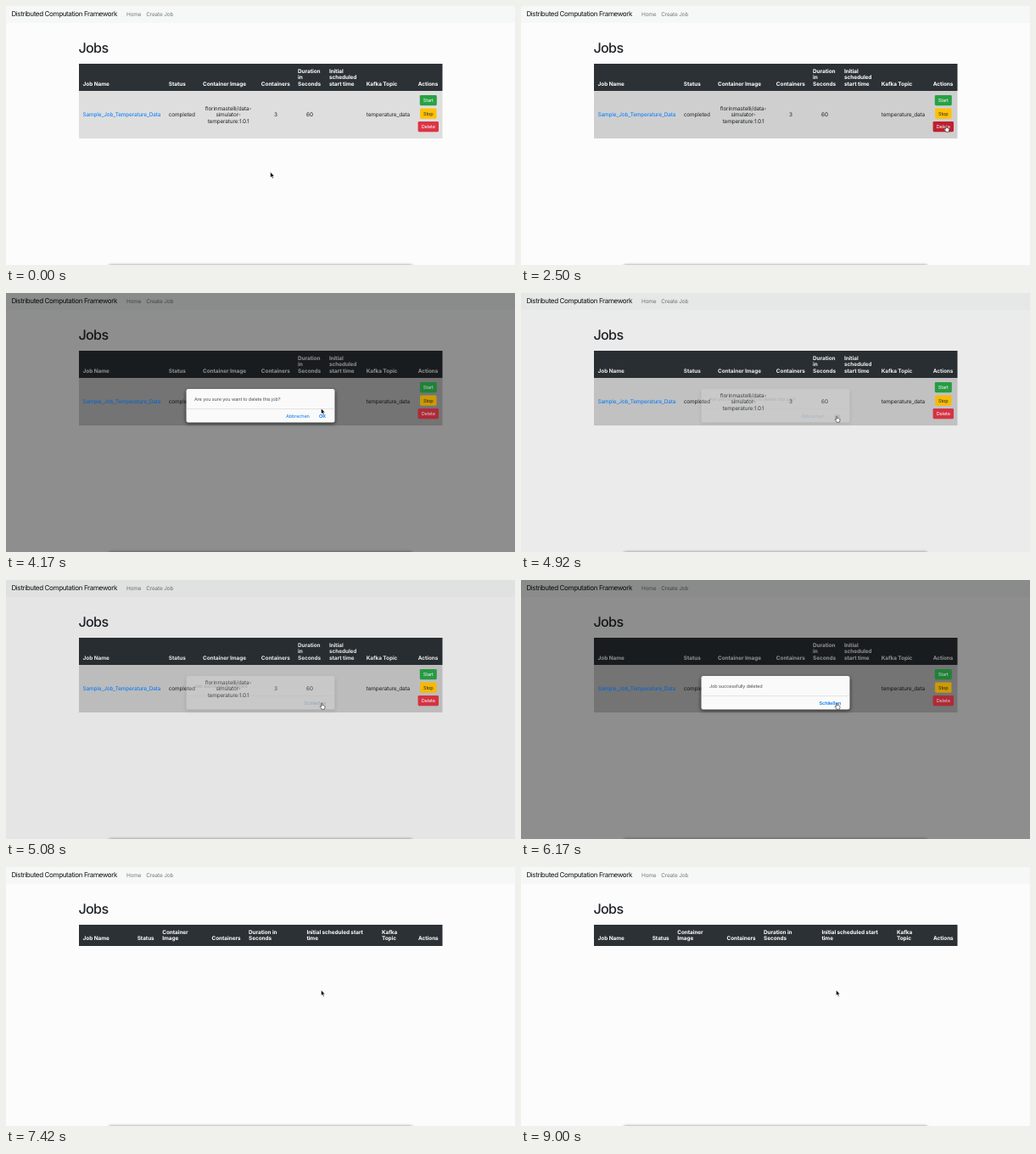
An HTML page that plays this animation: 600 by 305 pixels, repeating every 9.16 s.

```html
<!DOCTYPE html>
<html lang="en">
<head>
<meta charset="utf-8">
<title>Jobs</title>
<style>
  html, body { margin: 0; width: 100%; height: 100%; overflow: hidden; background: #fcfcfc; }
  svg { display: block; width: 600px; height: 305px; }
  text { font: 400 6.45px Inter, "Open Sans", sans-serif; letter-spacing: -.022em; fill: #212529;
         text-rendering: geometricPrecision; white-space: pre; }
  .brand { font-size: 8.05px; letter-spacing: -.048em; fill: #111; }
  .nav { fill: #777; }
  .title { font-size: 16.1px; font-weight: 500; letter-spacing: -.04em; }
  .head { font-weight: 700; letter-spacing: -.01em; fill: #fff; }
  .link { fill: #007bff; }
  .mid { text-anchor: middle; }
  .btn { font-size: 5.6px; text-anchor: middle; fill: #fff; }
  .dark { fill: #212529; }
  .msg { font-size: 5.55px; fill: #555; }
  .act { font-size: 5.55px; fill: #0a7be8; }
  .strong { font-weight: 600; }
</style>
</head>
<body>
<svg viewBox="0 0 600 305" xmlns="http://www.w3.org/2000/svg">
  <defs>
    <filter id="blur" x="-10%" y="-200%" width="120%" height="500%"><feGaussianBlur stdDeviation="1.6"/></filter>
    <filter id="soft" x="-10%" y="-30%" width="120%" height="160%"><feGaussianBlur stdDeviation="2"/></filter>
  </defs>
  <rect width="600" height="305" fill="#fcfcfc"/>
  <rect width="600" height="20" fill="#f6f8f8"/>
  <text class="brand" x="6.4" y="12.1">Distributed Computation Framework</text>
  <text class="nav" x="142" y="11.6">Home</text>
  <text class="nav" x="165.2" y="11.6">Create Job</text>
  <text class="title" x="85.4" y="55.2">Jobs</text>
  <g id="full">
    <rect x="86" y="68" width="428.5" height="32" fill="#2c3136"/>
    <rect id="row" x="86" y="100" width="428.5" height="56"/>
    <g id="fullHead"></g>
    <g id="cells"></g>
  </g>
  <g id="empty">
    <rect x="86" y="68" width="428.5" height="25" fill="#2c3136"/>
    <g id="emptyHead"></g>
  </g>
  <rect x="120" y="304.5" width="360" height="10" rx="4" opacity=".35" filter="url(#blur)"/>
  <rect id="shade" width="600" height="305"/>
  <g id="lifted">
    <text class="link" x="90.6" y="130.3">Sample_Job_Temperature_Data</text>
    <g id="buttons"></g>
  </g>
  <g id="dialog">
    <rect x="212" y="115" width="176" height="39" rx="3" opacity=".6" filter="url(#soft)"/>
    <rect x="212.5" y="113" width="175" height="39.5" rx="2.5" fill="#fafafa"/>
    <rect x="212.5" y="136.4" width="175" height=".6" fill="#d4d4d4"/>
    <g id="ask">
      <text class="msg" x="222" y="127.3">Are you sure you want to delete this job?</text>
      <text class="act" x="330" y="147">Abbrechen</text>
      <text class="act strong" x="369" y="147">OK</text>
    </g>
    <g id="done">
      <text class="msg" x="222" y="127.3">Job successfully deleted</text>
      <text class="act strong" x="351.6" y="147">Schließen</text>
    </g>
  </g>
  <g id="cursor" stroke-linejoin="round">
    <path id="arrow" d="M0 0V6.4L1.5 5.1 2.5 7.4 3.6 6.9 2.6 4.7H4.6Z" fill="#000" stroke="#fff" stroke-width=".5"/>
    <path id="hand" d="M.1 .6C.1-.2 1.3-.2 1.3.6V2.7C1.7 2.3 2.3 2.4 2.5 2.9 3 2.6 3.5 2.8 3.6 3.3 4.2 3.1 4.6 3.5 4.6 4.1 4.6 5.4 4 6 4 7.2H.5C.3 6.1-.8 5.2-1.5 4.2-1.6 3.5-.8 3.3.1 4.3Z" fill="#fff" stroke="#111" stroke-width=".55"/>
  </g>
</svg>
<script>
const NS = 'http://www.w3.org/2000/svg';
const LOOP = 9160, STEP = 1000 / 12, PITCH = 7.4;
const $ = id => document.getElementById(id);

function add(parent, tag, attrs, content = '') {
  const el = document.createElementNS(NS, tag);
  for (const key in attrs) el.setAttribute(key, attrs[key]);
  el.textContent = content;
  parent.append(el);
  return el;
}

// Column labels sit on the bottom line of the header.
function header(parent, bottom, columns) {
  for (const [x, label] of columns) {
    const lines = label.split('|');
    lines.forEach((line, i) => add(parent, 'text',
      { class: 'head', x, y: bottom - (lines.length - 1 - i) * PITCH }, line));
  }
}

header($('fullHead'), 93.6, [
  [90.6, 'Job Name'], [191.8, 'Status'], [232, 'Container Image'], [300.8, 'Containers'],
  [344, 'Duration|in|Seconds'], [381, 'Initial|scheduled|start time'], [424.8, 'Kafka Topic'], [485.7, 'Actions']
]);
header($('emptyHead'), 86.2, [
  [90.6, 'Job Name'], [154.7, 'Status'], [184.2, 'Container|Image'], [242.5, 'Containers'],
  [286, 'Duration in|Seconds'], [354.4, 'Initial scheduled start|time'], [443, 'Kafka|Topic'], [486, 'Actions']
]);

const cells = [
  [191.8, 130.3, 'completed'], [424.8, 130.3, 'temperature_data'],
  [262, 122.9, 'florinmastelli/data-', 'mid'], [262, 130.3, 'simulator-', 'mid'],
  [262, 137.7, 'temperature:1.0.1', 'mid'], [318, 130.3, '3', 'mid'], [358, 130.3, '60', 'mid']
];
for (const [x, y, label, cls = ''] of cells) add($('cells'), 'text', { x, y, class: cls }, label);

function button(label, y, width, fill, cls = '') {
  const box = add($('buttons'), 'rect', { x: 497.8 - width / 2, y, width, height: 12.3, rx: 1.4, fill });
  add($('buttons'), 'text', { class: 'btn ' + cls, x: 497.8, y: y + 8.2 }, label);
  return box;
}
button('Start', 104.9, 20, '#28a145');
button('Stop', 120.4, 19.4, '#ffc107', 'dark');
const del = button('Delete', 135.9, 24.4, '#dc3545');

// Rows are [time, values...], linear in between.
const path = [
  [420, 311.7, 195.6], [800, 345, 200], [1330, 440, 180], [2000, 496, 149], [2330, 500.3, 141],
  [3250, 500.3, 141], [3667, 383, 126], [3840, 383, 126], [4167, 371.5, 136], [4500, 371.5, 145]
];
const fade = [
  [2500, 0], [2583, .25], [2667, .65], [2750, 1], [4750, 1], [4833, .55], [4917, .15], [5000, 0],
  [5083, .2], [5167, .6], [5250, 1], [6167, 1], [6250, .55], [6333, .15], [6417, 0]
];

function sample(rows, t) {
  const n = rows.findIndex(row => row[0] > t);
  if (n === 0) return rows[0].slice(1);
  if (n < 0) return rows[rows.length - 1].slice(1);
  const a = rows[n - 1], b = rows[n], p = (t - a[0]) / (b[0] - a[0]);
  return a.slice(1).map((v, i) => v + (b[i + 1] - v) * p);
}

const show = (id, on) => { $(id).style.display = on ? '' : 'none'; };

function draw(time) {
  const t = Math.floor((time % LOOP + 4) / STEP) * STEP;
  const [x, y] = sample(path, t), [open] = sample(fade, t);
  const gone = t > 6480;
  const onDelete = t < 2900 && x > 485.6 && y > 136 && y < 148;
  const hand = onDelete || (t > 4900 && !gone);

  show('full', !gone);
  show('lifted', !gone);
  show('empty', gone);
  $('row').setAttribute('fill', y < 156 ? '#cfcfcf' : '#dedede');
  del.setAttribute('fill', onDelete ? '#bd2130' : '#dc3545');

  $('shade').setAttribute('opacity', .44 * open);
  $('lifted').style.filter = open ? `brightness(${1 - .2 * open})` : 'none';
  $('dialog').setAttribute('opacity', open);
  show('ask', t < 4990);
  show('done', t >= 4990);

  $('cursor').setAttribute('transform', `translate(${x} ${y})`);
  show('hand', hand);
  show('arrow', !hand);
}

const start = performance.now();
function tick() {
  draw(performance.now() - start);
  requestAnimationFrame(tick);
}
tick();
</script>
</body>
</html>
```
